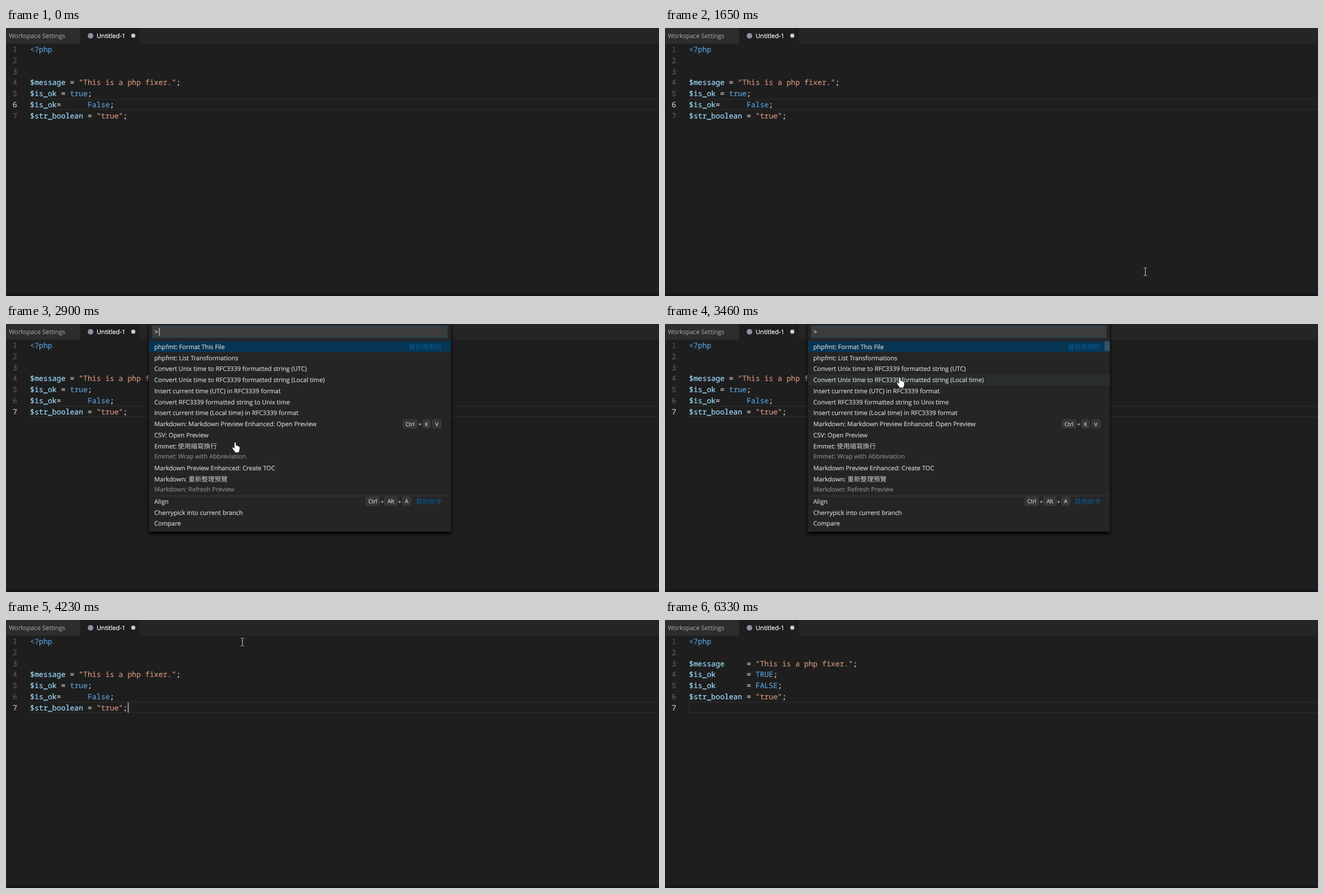
Recreate the animation shown at these times as an HTML page. Size 1167 by 480 pixels, loop 6.43 s.

```html
<!DOCTYPE html>
<html lang="en">
<head>
<meta charset="utf-8">
<title>PHP formatter</title>
<style>
  html, body { margin: 0; width: 100%; height: 100%; overflow: hidden; background: #1e1e1e; }
  svg { display: block; width: 100%; height: 100%; }
  text {
    font: 11.1px "Open Sans", "Noto Sans", sans-serif; white-space: pre; text-rendering: geometricPrecision;
    color: #d0d0d0; fill: currentColor; stroke: currentColor; stroke-width: .22px;
  }
  .code { font: 13.2px "Noto Sans Mono", "DejaVu Sans Mono", monospace; }
  .cjk { font: 11.65px "Noto Sans CJK TC", "Noto Sans CJK JP", "Noto Sans CJK", sans-serif; stroke: none; }
  .group { color: #045f9b; }
  .detail { color: #868686; }
  .key { font-size: 9.8px; text-anchor: middle; }
  .panel { filter: drop-shadow(0 4px 3px #000); }
</style>
</head>
<body>
<svg id="stage" viewBox="0 0 1167 480"></svg>
<script>
const LOOP = 6430, PITCH = 19.75, LEFT = 43, CHAR = 7.92;
const T = { click: 2540, open: 2900, hover: 3070, blur: 4060, close: 4230, format: 4840, leave: 5850 };
const stage = document.getElementById('stage');

function add(parent, tag, attrs, content) {
  const node = document.createElementNS('http://www.w3.org/2000/svg', tag);
  for (const key in attrs) node.setAttribute(key, attrs[key]);
  if (content !== undefined) node.textContent = content;
  parent.appendChild(node);
  return node;
}
const rect = (parent, x, y, width, height, fill, more) =>
  add(parent, 'rect', { x, y, width, height, fill, ...more });
const label = (parent, x, y, str, cls = '', color) =>
  add(parent, 'text', { x, y, class: cls, ...(color && { style: 'color:' + color }) }, str);
const group = () => add(stage, 'g', {});
const show = (node, on) => node.setAttribute('display', on ? 'inline' : 'none');
const lineTop = n => 28.6 + PITCH * (n - 1);
const baseline = n => 43 + PITCH * (n - 1);

// Window frame and tabs
rect(stage, 0, 0, 1167, 480, '#1e1e1e');
rect(stage, 0, 0, 1167, 28, '#252526');
rect(stage, 0, 0, 132, 28, '#2d2d2d');
rect(stage, 133, 0, 106, 28, '#1e1e1e');
rect(stage, 0, 476, 1167, 4, '#1a1317');
label(stage, 5, 18, 'Workspace Settings', '', '#979797');
add(stage, 'circle', { cx: 151, cy: 14, r: 5, fill: '#938fa6' });
label(stage, 162, 18, 'Untitled-1', '', '#fff');
add(stage, 'circle', { cx: 227.5, cy: 13.7, r: 3.7, fill: '#cccfca' });

// Editor
const lineBox = rect(stage, LEFT + .5, 0, 1130, 18.4, 'none', { stroke: '#2a2a2a', 'stroke-width': 1.5 });
const numbers = [1, 2, 3, 4, 5, 6, 7].map(n =>
  label(stage, 12, baseline(n), n, 'code'));

function codeBlock(lines) {
  const block = group();
  const colors = ['#9cdcfe', '#ce9178', '#569cd6', '#d4d4d4'];
  lines.forEach((line, i) => {
    for (const m of line.matchAll(/(\$\w+)|("[^"]*")|(<\?php|true|false)|(\S)/gi)) {
      const kind = [1, 2, 3, 4].findIndex(k => m[k]);
      label(block, LEFT + CHAR * m.index, baseline(i + 1), m[0], 'code', colors[kind]);
    }
  });
  return block;
}
const before = codeBlock(['<?php', '', '',
  '$message = "This is a php fixer.";',
  '$is_ok = true;',
  '$is_ok=      False;',
  '$str_boolean = "true";']);
const after = codeBlock(['<?php', '',
  '$message     = "This is a php fixer.";',
  '$is_ok       = TRUE;',
  '$is_ok       = FALSE;',
  '$str_boolean = "true";']);
const caret = rect(stage, 0, lineTop(7) + .4, 1.6, 18.6, '#b4b5b3');

// Command palette: [centre, text, CJK x, CJK text, detail]
const rows = [
  [41, 'phpfmt: Format This File'],
  [60.5, 'phpfmt: List Transformations'],
  [80.3, 'Convert Unix time to RFC3339 formatted string (UTC)'],
  [100, 'Convert Unix time to RFC3339 formatted string (Local time)'],
  [119.8, 'Insert current time (UTC) in RFC3339 format'],
  [139.6, 'Convert RFC3339 formatted string to Unix time'],
  [159.4, 'Insert current time (Local time) in RFC3339 format'],
  [179.1, 'Markdown: Markdown Preview Enhanced: Open Preview'],
  [198.9, 'CSV: Open Preview'],
  [218.7, 'Emmet: ', 307, '使用縮寫換行', 'Emmet: Wrap with Abbreviation'],
  [258.2, 'Markdown Preview Enhanced: Create TOC'],
  [278, 'Markdown: ', 326, '重新整理預覽', 'Markdown: Refresh Preview'],
  [318, 'Align'],
  [337.6, 'Cherrypick into current branch'],
  [357.3, 'Compare']
];
const palette = group();
rect(palette, 255.5, -10, 539.5, 382, '#252526', { class: 'panel' });
const input = rect(palette, 261.5, 3.5, 527, 21, '#3c3c3c');
label(palette, 265.5, 18, '>');
const inputCaret = rect(palette, 273.4, 7, 1.2, 14, '#d0d0d0');
const hover = rect(palette, 255.5, 0, 539.5, 19.8, '#2a2d2e');
rect(palette, 255.5, 31, 539.5, 19.5, '#073655');
rect(palette, 255.5, 307.5, 539.5, 1, '#3f3f46');

for (const [mid, str, x, cjk, detail] of rows) {
  label(palette, 265, mid + 4, str);
  if (cjk) {
    label(palette, x, mid + 4.4, cjk, 'cjk');
    label(palette, 265, mid + 22.2, detail, 'detail');
  }
}
label(palette, 720, 45.3, '最近使用的', 'cjk group');
label(palette, 732, 322.3, '其他命令', 'cjk group');

function keyCap(x, width, mid, str) {
  rect(palette, x + .5, mid - 7.8, width - 1, 15, '#353536', { rx: 2.5, stroke: '#434344' });
  label(palette, x + width / 2, mid + 3.4, str, 'key');
}
const plus = (x, mid) => label(palette, x, mid + 4, '+', 'key');
keyCap(709, 26, 179.1, 'Ctrl');
plus(739.5, 179.1);
keyCap(744, 15, 179.1, 'K');
keyCap(762, 16, 179.1, 'V');
keyCap(643, 25, 318, 'Ctrl');
plus(672.5, 318);
keyCap(676, 24, 318, 'Alt');
plus(703.5, 318);
keyCap(708, 16, 318, 'A');
const scrollbar = rect(palette, 785.5, 31, 9.5, 17.5, '#797979', { 'fill-opacity': .42 });

// Pointers, drawn around their hot spot
const beam = add(stage, 'path', {
  d: 'M-3 -7H-1L0 -6 1 -7H3M0 -6V6M-3 7H-1L0 6 1 7H3',
  fill: 'none', stroke: '#dcdcdc', 'stroke-width': 1
});
const hand = add(stage, 'path', {
  d: 'M-1.6 1Q0 -1 1.6 1V6Q3 5 4 6.6Q5.6 6 6.4 7.5Q8.2 7.2 8.4 9V13Q8.4 15 7 17V19H-1V17Q-3 15 -5 11.5Q-5.8 9.5 -4.3 9Q-3 9 -1.6 11Z',
  fill: '#fff', stroke: '#111', 'stroke-width': .9, 'stroke-linejoin': 'round'
});

// Pointer moves: start, end, number of steps, evenly spaced way points
const moves = [
  { from: 1270, to: 1910, n: 9, path: [[958, 473], [898, 450], [858, 436], [844, 430.5]] },
  { from: 1970, to: 2370, n: 6, path: [[844, 430.5], [690, 352], [485, 248], [409.5, 211.5]] },
  { from: 3070, to: 3700, n: 9, path: [[409.5, 211.5], [412, 165], [419, 95], [422, 56]] },
  { from: 3780, to: 4060, n: 4, path: [[422, 56], [423, 45], [422.5, 39.5]] },
  { from: 4690, to: 5310, n: 9, path: [[422.5, 39.5], [442, 50], [512, 93], [571.5, 141], [568, 165]] },
  { from: 5410, to: 5850, n: 7, path: [[568, 165], [680, 235], [900, 370], [1194, 543]] }
];

function pointerAt(t) {
  const move = moves.filter(m => m.from <= t).pop() || moves[0];
  const { from, to, n, path } = move;
  const step = Math.min(n - 1, Math.floor((t - from) / (to - from) * (n - 1) + .3));
  const pos = Math.max(0, step + 1) / n * (path.length - 1);
  const i = Math.min(path.length - 2, Math.floor(pos));
  return [0, 1].map(k => Math.floor(path[i][k] + (path[i + 1][k] - path[i][k]) * (pos - i)) + .5);
}

const within = (t, a, b) => t >= a && t < b;

function render(t) {
  const open = within(t, T.open, T.close);
  const formatted = t >= T.format;
  const active = t < T.click ? 6 : 7;

  show(before, !formatted);
  show(after, formatted);
  lineBox.setAttribute('y', lineTop(active) + .2);
  numbers.forEach((node, i) => node.style.color = i + 1 === active ? '#c6c6c6' : '#5a5a5a');

  caret.setAttribute('x', formatted ? LEFT + .2 : 217.6);
  show(caret, within(t, T.click, T.open) || within(t, T.close, 4690) ||
    within(t, T.format, 5310) || within(t, 5850, 6330));

  const [x, y] = pointerAt(t);
  const place = `translate(${x} ${y})`;
  beam.setAttribute('transform', place);
  hand.setAttribute('transform', place);
  show(beam, !open && within(t, moves[0].from, T.leave));
  show(hand, open);

  show(palette, open);
  if (!open) return;
  input.setAttribute('stroke', t < T.blur ? '#1a4a68' : '#3c3c3c');
  show(inputCaret, within(t, T.open, 3400) || within(t, 3870, T.blur));
  show(scrollbar, t >= T.hover);
  const row = rows.filter(r => r[0] - 9.9 <= y).pop();
  show(hover, t >= T.hover && row);
  if (row) {
    hover.setAttribute('y', row[0] - 9.9);
    hover.setAttribute('height', row[4] ? 39.5 : 19.8);
  }
}

const start = performance.now();
function tick() {
  render((performance.now() - start) % LOOP);
  requestAnimationFrame(tick);
}
render(0);
requestAnimationFrame(tick);
</script>
</body>
</html>
```
